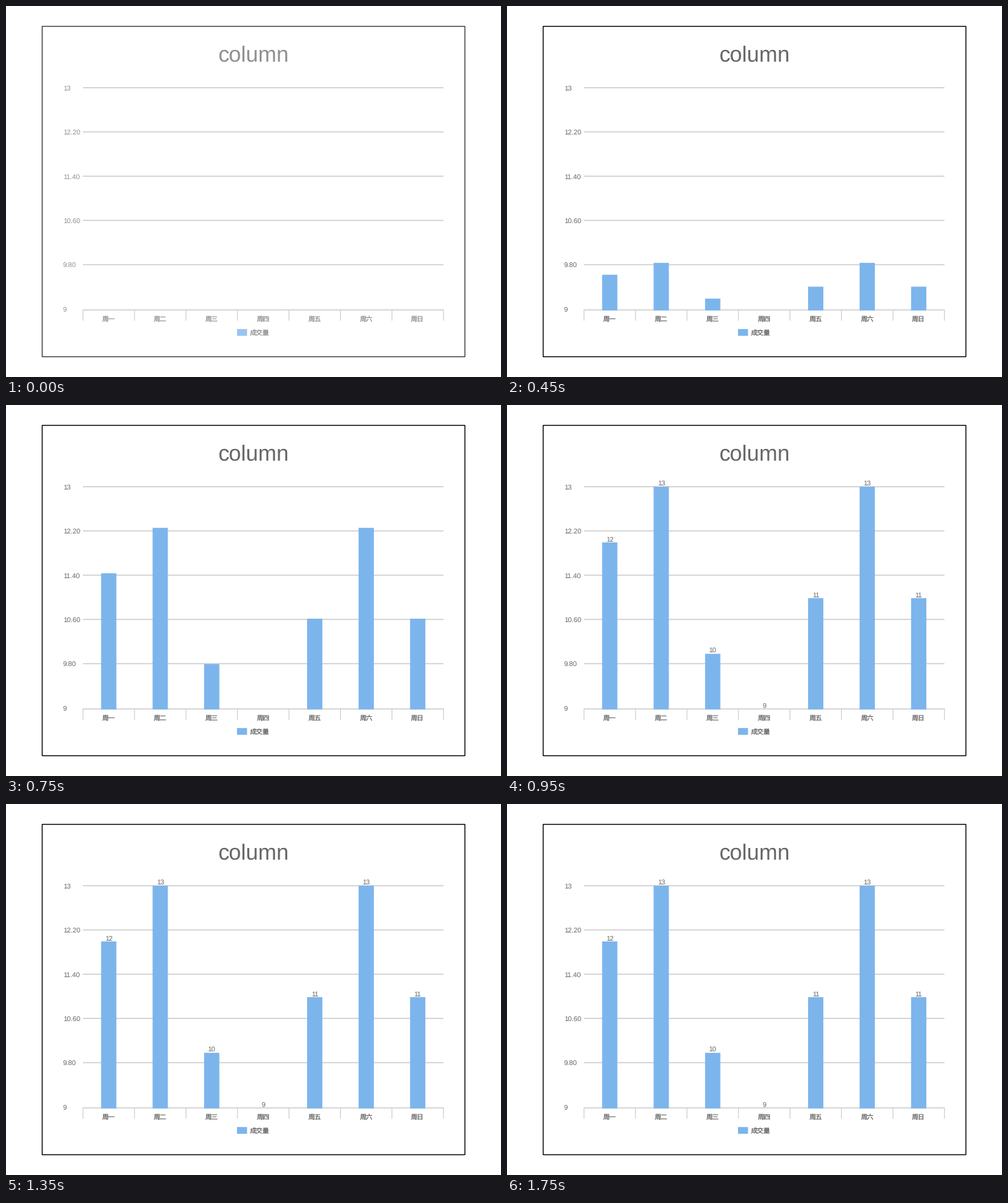
Write a matplotlib script that moves like this. It is 720x540 px and loops after 1.8 s.

```python
import matplotlib.pyplot as plt
import numpy as np
from matplotlib.animation import FuncAnimation
from matplotlib.patches import Rectangle

W, H, DPI = 720, 540, 100
FRAMES, STEP = 36, 50
PT = 72 / DPI
LATIN, CJK = "Liberation Sans", "Noto Sans CJK JP"
BLUE, GRAY, LINE = "#7cb5ec", "#666666", "#cccccc"

VALUES = [12, 13, 10, 9, 11, 13, 11]
DAYS = "一二三四五六日"
LEFT, RIGHT, BASE, TOP = 112, 636.3, 443.2, 119
SLOT = (RIGHT - LEFT) / len(VALUES)
BAR_W = 22.2

plt.rcParams["text.hinting"] = "none"
plt.rcParams["toolbar"] = "None"

fig = plt.figure(figsize=(W / DPI, H / DPI), dpi=DPI, facecolor="white")
ax = fig.add_axes([0, 0, 1, 1])
ax.set(xlim=(0, W), ylim=(H, 0))
ax.axis("off")


def text(x, y, s, size, font=LATIN, ha="center"):
    return ax.text(x, y, s, fontsize=size * PT, family=font, color=GRAY,
                   ha=ha, va="baseline", zorder=4)


def line(xs, ys, width):
    ax.plot(xs, ys, color=LINE, lw=width * PT, solid_capstyle="butt",
            snap=False, zorder=1)


def box(x, y, w, h):
    return ax.add_patch(Rectangle((x, y), w, h, fc=BLUE, lw=0,
                                  snap=False, zorder=2))


border = ax.add_patch(Rectangle((52.6, 29.6), 614.9, 480.9, fill=False,
                                lw=1.35 * PT, snap=False, zorder=3))
texts = [text(360, 81, "column", 32)]

# Horizontal grid with value labels
for i, name in enumerate(["13", "12.20", "11.40", "10.60", "9.80", "9"]):
    y = 118.9 + 64.4 * i if i < 5 else 442.4
    line([LEFT, RIGHT], [y, y], 1.5)
    texts.append(text(83, 123.7 + 64.4 * i, name, 10, ha="left"))

# Category ticks and names
for i in range(len(DAYS) + 1):
    x = LEFT + SLOT * i
    line([x, x], [442, 458], 1.1)
centers = [LEFT + SLOT * (i + 0.5) for i in range(len(DAYS))]
for x, day in zip(centers, DAYS):
    texts.append(text(x, 458.6, "周" + day, 9.5, CJK))

key = box(336, 470.2, 14.6, 9.8)
texts.append(text(355.3, 479.1, "成交量", 9.5, CJK, "left"))

heights = [(v - 9) / 4 * (BASE - TOP) for v in VALUES]
bars = [box(x - BAR_W / 2, BASE, BAR_W, 0) for x in centers]
labels = [text(x, BASE - h - 1.4, str(v), 10)
          for x, h, v in zip(centers, heights, VALUES)]


def progress(ms):
    """Cubic ease-in over a clock that runs at a nearly even pace."""
    clock = np.interp(ms, [-67, 250, 450, 650, 808], [0, 0.364, 0.598, 0.821, 1])
    return clock ** 3


def update(frame):
    p = progress(frame * STEP)
    fresh = frame == 0
    border.set_edgecolor("#3c3c3c" if fresh else "black")
    key.set_facecolor("#99c5ef" if fresh else BLUE)
    for t in texts:
        t.set_color("#909090" if fresh else GRAY)
    for bar, h in zip(bars, heights):
        size = h * p
        bar.set_y(BASE - size)
        bar.set_height(size)
        bar.set_visible(size > 0.5)
    for label in labels:
        label.set_visible(p >= 1)
    return [border, key, *texts, *bars, *labels]


anim = FuncAnimation(fig, update, frames=FRAMES, interval=STEP,
                     repeat=True, repeat_delay=0, blit=False)
plt.show()
```
